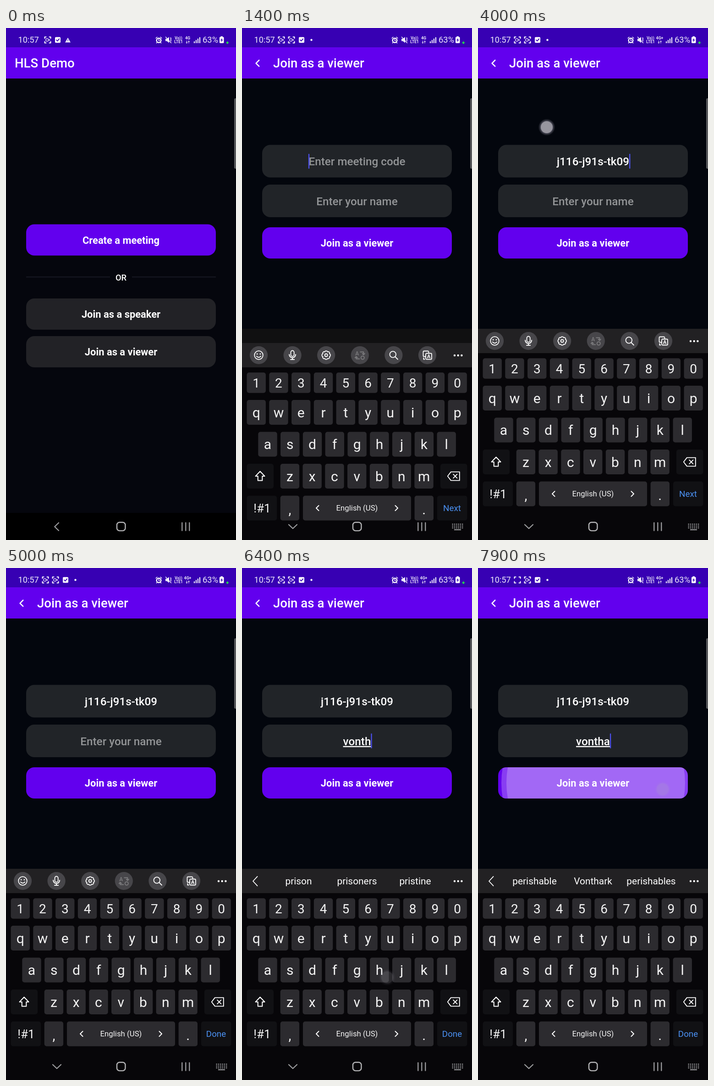
Write an HTML page that moves like this. It is 502 px wide and 1115 px high and loops after 8 s.

```html
<!DOCTYPE html>
<html lang="en">
<head>
<meta charset="utf-8">
<title>HLS Demo</title>
<style>
html, body { margin: 0; width: 100%; height: 100%; overflow: hidden; background: #000; }
svg { display: block; width: 502px; height: 1115px; font-family: Roboto, sans-serif; fill: #fff; }
text { white-space: pre; }
.line { fill: none; stroke: #fff; stroke-width: 2; stroke-linecap: round; stroke-linejoin: round; }
.mid { text-anchor: middle; }
</style>
</head>
<body>
<svg id="stage" viewBox="0 0 502 1115"></svg>
<script>
const LOOP = 8000, STEP = 100, LIFT = -201.5;
const CODE = 'j116-j91s-tk09', NAME = 'vontha';
const TYPED_AT = [5300, 5500, 5800, 6100, 6300, 6700];
const HINTS = ['very|video|visit', 'voice|volume|vote', 'voice|volume|vow', 'front|month|won’t',
  'prison|prisoners|pristine', 'perishable|Vonthark|perishables'];

const rect = (x, y, w, h, r, fill, more = '') =>
  `<rect x="${x}" y="${y}" width="${w}" height="${h}" rx="${r}" fill="${fill}" ${more}/>`;
const circle = (x, y, r, fill, more = '') => `<circle cx="${x}" cy="${y}" r="${r}" fill="${fill}" ${more}/>`;
const line = (d, more = '') => `<path class="line" d="${d}" ${more}/>`;
const label = (s, x, y, size, more = '') => `<text x="${x}" y="${y}" font-size="${size}" ${more}>${s}</text>`;
const mid = (s, x, y, size, weight = 400, more = '') =>
  label(s, x, y, size, `class="mid" font-weight="${weight}" ${more}`);
const group = (id, body, more = '') => `<g id="${id}" ${more}>${body}</g>`;
const at = (x, y, body, more = '') => `<g transform="translate(${x} ${y})" ${more}>${body}</g>`;

const button = (s, y, fill) => rect(44, y, 414, 68, 18, fill) + mid(s, 251, y + 42, 21.9, 700);
const field = y => rect(44, y, 414, 71, 18, '#212428');

/* Status bar */
const brackets = line('M-6.5-3.5V-6.5H-3.5M3.5-6.5H6.5V-3.5M6.5 3.5V6.5H3.5M-3.5 6.5H-6.5V3.5', 'stroke-width="1.4"');
const camera = rect(-4, -2.6, 5.4, 5.2, 1.2, 'none', 'stroke="#fff" stroke-width="1.2"') +
  '<path d="M2 0L4.6-2.4V2.4Z"/>';
const check = rect(-6, -6.3, 12, 12.6, 2, '#fff') + line('M-3 0L-.8 2.4L3.2-2.4', 'style="stroke:#3700b3;stroke-width:1.8"');
const warning = '<path d="M0-5L6 5.5H-6Z"/>' + rect(-.5, -1, 1, 3.4, 0, '#3700b3');

function statusBar() {
  const alarm = circle(0, 1, 4.8, 'none', 'stroke="#fff" stroke-width="2.4"') +
    line('M-6.3-3.8L-3.6-6.2M6.3-3.8L3.6-6.2M0-1.5V1.5H2M-4 5.5L-5 6.8M4 5.5L5 6.8', 'style="stroke-width:1.5"');
  const mute = '<path d="M-7-2.5H-4L1-6.5V6.5L-4 2.5H-7Z"/>' +
    line('M-6.5-6.5L5.5 6.5M4-5L5.5-3.5L4-2L5.5-.5L4 1L5.5 2.5', 'style="stroke-width:1.3"');
  const bars = [4, 7, 10, 13].map((h, i) => rect(410 + i * 4, 33 - h, 2, h, .6, '#fff')).join('');
  const battery = rect(466, 19.5, 9.5, 13.5, 1.8, '#fff') + rect(468.6, 18, 4.3, 2, .6, '#fff') +
    '<path d="M471.8 21.8L468 27H470.4L469.6 31L473.6 25.6H471.2Z" fill="#3700b3"/>';
  return rect(0, 0, 502, 42, 0, '#3700b3') +
    `<g fill="#ece8fa">` + label('10:57', 26.5, 32.3, 18.2) +
    group('iconsA', at(91, 26, brackets + camera) + at(113, 26, check) + at(135, 26, warning)) +
    group('iconsB', at(86, 26, brackets + group('rec', camera)) + at(108, 26, brackets + camera) +
      at(130, 26, check) + circle(151.5, 26, 2.2, '#fff')) +
    at(333.5, 26, alarm) + at(355, 26, mute) +
    mid('Vo))', 376.5, 24.8, 8.6, 700) + mid('LTE1', 376.5, 33.2, 8.4, 700) +
    `<text id="net" class="mid" x="396.5" y="25" font-size="8.8" font-weight="700"></text>` +
    line('M394.5 28V33M392.8 31.5L394.5 33.2L396.2 31.5M399 33V28M397.3 29.7L399 28L400.7 29.7', 'style="stroke-width:1"') +
    bars + label('63%', 429, 32.3, 18.4) + battery + '</g>' + circle(483.3, 32, 2.4, '#24e04c');
}

/* App pages */
const header = (s, x) => rect(0, 42, 502, 68, 0, '#6200ee') + label(s, x, 86.3, 27.6, 'font-weight="500"');

const homePage = () => rect(0, 42, 502, 1014, 0, '#05060d') + header('HLS Demo', 19) +
  button('Create a meeting', 427.5, '#6200ee') +
  rect(44, 541, 183, 2.4, 0, '#15161f') + rect(275, 541, 183, 2.4, 0, '#15161f') +
  mid('OR', 251, 549.7, 18.4, 500) +
  button('Join as a speaker', 589, '#222226') + button('Join as a viewer', 671, '#222226') +
  rect(44, 671, 414, 68, 18, '#fff', 'id="press" opacity=".12"');

const joinPage = () => rect(0, 42, 502, 1014, 0, '#03060d') + header('Join as a viewer', 68) +
  line('M37.2 70.2L30.6 76.8L37.2 83.4', 'style="stroke-width:2.6"') +
  group('form', field(456) + field(542.5) +
    mid('', 251, 500.8, 24.3, 500, 'id="codeText"') +
    mid('', 251, 587.2, 24.3, 500, 'id="nameText"') +
    rect(0, 0, 2.3, 32, 0, '#4c50ee', 'id="caret"') +
    rect(44, 635.5, 414, 68, 18, '#6200ee') +
    '<clipPath id="edge">' + rect(44, 635.5, 414, 68, 18, '#fff') + '</clipPath>' +
    group('ripple', circle(0, 0, 0, '#fff', 'opacity=".24"') + circle(0, 0, 0, '#fff', 'opacity=".22"'), 'clip-path="url(#edge)"') +
    mid('Join as a viewer', 251, 677.5, 21.9, 700)) +
  group('paste', rect(98, 188, 98, 48, 14, '#38383c') + mid('Paste', 147, 218.5, 19) +
    '<path d="M147 308L154 315.5A9.6 9.6 0 1 1 140 315.5Z" fill="#4c50ee"/>');

/* Keyboard */
const keyAt = {};
function keyRow(chars, x, y, h, size, drop) {
  return [...chars].map((c, i) => {
    const cx = x + i * 48.78;
    keyAt[c] = [cx, y];
    return rect(cx - 20.7, y - h / 2, 41.4, h, 5, '#2c2b2f') + mid(c, cx, y + drop, size);
  }).join('');
}

function toolbar() {
  const gear = [...Array(8)].map((_, i) => {
    const a = i * Math.PI / 4, p = (r, d) => (r * Math.cos(a + d)).toFixed(1) + ' ' + (r * Math.sin(a + d)).toFixed(1);
    return (i ? 'L' : 'M') + p(9.4, -.2) + 'L' + p(9.4, .2) + 'L' + p(7.6, .39);
  }).join('') + 'Z';
  const ring = (r, x = 0, y = 0) => circle(x, y, r, 'none', 'stroke="#fff" stroke-width="1.8"');
  const icons = [
    ring(9.3) + circle(-3.4, -2.6, 1.4, '#fff') + circle(3.4, -2.6, 1.4, '#fff') + line('M-4.6 2.4Q0 7 4.6 2.4'),
    rect(-3.6, -10, 7.2, 12.5, 3.6, 'none', 'stroke="#fff" stroke-width="1.8"') + line('M-7-1.5A7 7 0 0 0 7-1.5M0 6V9.5M-4 9.5H4'),
    line(gear, 'style="stroke-width:1.7"') + ring(3),
    `<g opacity=".28">` + mid('A', -6, 0, 12, 500) + ring(3.6, 6, 5.5) + line('M1-7H8V-1M5.5-3.5L8-1L10.5-3.5M-1 8H-8V3M-10.5 5.5L-8 3L-5.5 5.5') + '</g>',
    ring(6.8, -1.6, -1.6) + line('M3.6 3.6L9 9'),
    rect(-9, -9, 12, 12, 2, 'none', 'stroke="#fff" stroke-width="1.8"') +
      rect(-3.5, -4, 13, 13, 2, '#47464a', 'stroke="#fff" stroke-width="1.8"') + mid('A', 3, 6.7, 11.5, 700) + line('M-8 6V9H-6')
  ];
  return icons.map((s, i) => at(36.5 + i * 73.6, 681.5, circle(0, 0, 19.6, '#47464a') + s)).join('');
}

function keyboard() {
  const dark = (x, w, y) => rect(x, y - 27, w, 54, 5, '#111114');
  return rect(0, 655, 502, 500, 0, '#070609') + rect(0, 655, 502, 53, 0, '#222123') +
    group('tools', toolbar()) +
    group('hints', line('M33.5 671.8L24 682L33.5 692.2', 'style="stroke-width:1.8"') +
      [123.5, 251, 378].map(x => mid('', x, 689.3, 20.9)).join('')) +
    [464, 471.7, 479.4].map(x => circle(x, 682, 2.2, '#fff')).join('') +
    `<g fill="#f4f4f4">` +
    keyRow('1234567890', 31.2, 741.5, 44.5, 28, 10) +
    keyRow('qwertyuiop', 31.2, 806, 54, 30, 10.5) +
    keyRow('asdfghjkl', 56, 875.5, 54, 30, 10.5) +
    keyRow('zxcvbnm', 104.4, 945, 54, 30, 10.5) +
    dark(10.5, 58.5, 945) + dark(433, 58.5, 945) + dark(10.5, 65.5, 1014.5) + dark(426, 65.5, 1014.5) +
    line('M39.5 934.5L49.5 945H44.3V954.5H34.7V945H29.5Z') +
    line('M448.8 945L456 935.6H474.8V954.4H456ZM461.2 940.8L469.4 949.2M469.4 940.8L461.2 949.2', 'style="stroke-width:1.9"') +
    mid('!#1', 44, 1023.6, 26) + keyRow(',', 104.4, 1014.5, 54, 30, 13) + keyRow('.', 397.3, 1014.5, 54, 30, 13) +
    rect(133, 987.5, 236, 54, 5, '#2c2b2f') + mid('English (US)', 251, 1020.4, 16.8) +
    line('M167.5 1009L162 1014.5L167.5 1020M334.5 1009L340 1014.5L334.5 1020') +
    mid('', 458.5, 1021.4, 18.8, 400, 'id="action" fill="#4b91f2"') + '</g>';
}

const navBar = () => {
  const soft = 'style="stroke:#9c9c9f;stroke-width:2.3"';
  let pad = '';
  for (let i = 0; i < 18; i++) pad += rect(458.5 + i % 6 * 4.3, 1079.5 + (i / 6 | 0) * 4, 2.4, 2.2, 0, '#9c9c9f');
  return group('back', line('M115 1077.5L106.2 1086L115 1094.5', soft)) +
    group('hide', line('M102 1081.5L111 1090L120 1081.5', soft) + pad + rect(463, 1091.5, 15, 2.2, 0, '#9c9c9f')) +
    rect(242, 1076.5, 18.4, 18.4, 5.8, 'none', 'stroke="#b4b4b6" stroke-width="2.4"') +
    line('M384.3 1077.5V1094.5M392.3 1077.5V1094.5M400.3 1077.5V1094.5', soft);
};

const stage = document.getElementById('stage');
stage.innerHTML =
  `<radialGradient id="glow"><stop offset=".66" stop-color="#bbb7cc" stop-opacity=".5"/>
   <stop offset="1" stop-color="#8e8a9c" stop-opacity="0"/></radialGradient>` +
  rect(0, 0, 502, 1115, 0, '#000') + group('home', homePage()) + group('join', joinPage()) +
  rect(498, 153, 8, 153.5, 3, '#58595c') + statusBar() +
  group('board', rect(0, 655, 502, 460, 0, '#101011') + group('keys', keyboard())) + navBar() +
  group('touch', circle(0, 0, 18.5, 'url(#glow)') + circle(0, 0, 13, '#aaa8b0', 'opacity=".75"'));

const el = {};
stage.querySelectorAll('[id]').forEach(n => el[n.id] = n);
const show = (id, on) => el[id].setAttribute('display', on ? 'inline' : 'none');
const move = (id, x, y) => el[id].setAttribute('transform', `translate(${x} ${y})`);
const setText = (node, s) => { if (node.textContent !== s) node.textContent = s; };

/* x, y, first moment, moment of release */
const touches = [[400, 716, 100, 300], [392, 505, 1000, 1300], [387, 297, 2700, 3100],
  [150, 216, 3900, 4100], [396, 390, 4400, 4600], [403, 482, 7500, 7900],
  ...[...NAME].map((c, i) => [keyAt[c][0] + 17, keyAt[c][1] + 16, TYPED_AT[i] - 100, TYPED_AT[i] + 100])];

function drawTouch(t) {
  const hit = touches.find(p => t >= p[2] && t <= p[3]);
  show('touch', hit);
  if (!hit) return;
  move('touch', hit[0], hit[1]);
  el.touch.setAttribute('opacity', t < hit[3] ? 1 : .25);
}

function drawForm(t, count) {
  const pasted = t >= 4000, second = t >= 4500;
  setText(el.codeText, pasted ? CODE : 'Enter meeting code');
  el.codeText.setAttribute('fill', pasted ? '#fff' : '#929496');
  setText(el.nameText, count ? NAME.slice(0, count) : 'Enter your name');
  el.nameText.setAttribute('fill', count ? '#fff' : '#929496');
  el.nameText.setAttribute('text-decoration', count ? 'underline' : 'none');

  // The caret blinks from the last moment it was reset.
  const since = [1200, 3000, 4000, 4500, ...TYPED_AT].filter(s => s <= t).pop();
  show('caret', since !== undefined && Math.floor((t - since) / 500) % 2 === 0 && !(t >= 2700 && t < 3000));
  const node = second ? el.nameText : el.codeText;
  const half = node.getComputedTextLength() / 2;
  const filled = second ? count : pasted;
  el.caret.setAttribute('x', filled ? 251 + half : 250.5 - half);
  el.caret.setAttribute('y', second ? 562 : 475.7);
}

function drawRipple(t) {
  const k = (t - 7500) / 400;
  show('ripple', k > 0);
  if (k <= 0) return;
  [...el.ripple.children].forEach((c, i) => {
    c.setAttribute('cx', 403 - 146 * k);
    c.setAttribute('cy', 683.5 - 14 * k);
    c.setAttribute('r', (i ? 195 : 206) * (.2 + .8 * k));
  });
}

function render(t) {
  const count = TYPED_AT.filter(s => s <= t).length;
  const open = t >= 1300;
  show('iconsA', t < 300);
  show('iconsB', t >= 300);
  show('rec', Math.floor(t / 500) % 2 === 0);
  setText(el.net, t < 2500 ? '4G' : '4G+');

  show('press', t === 200);
  show('join', t >= 300);
  const enter = t === 300 ? .6 : t === 400 ? .93 : 1;
  el.join.setAttribute('opacity', enter);
  move('join', 150 * (1 - enter), 0);
  move('form', 0, open ? LIFT : 0);
  drawForm(t, count);
  drawRipple(t);
  show('paste', t >= 3100 && t < 4000);

  show('board', open);
  show('hide', open);
  show('back', !open);
  move('keys', 0, t === 1300 ? 170 : t === 1400 ? 31 : 0);
  setText(el.action, t < 4500 ? 'Next' : 'Done');
  show('tools', !count);
  show('hints', count);
  if (count) {
    const words = HINTS[count - 1].split('|');
    el.hints.querySelectorAll('text').forEach((n, i) => setText(n, words[i]));
  }
  drawTouch(t);
}

const start = performance.now();
function tick() {
  render(Math.floor((performance.now() - start) % LOOP / STEP) * STEP);
  requestAnimationFrame(tick);
}
tick();
</script>
</body>
</html>
```
